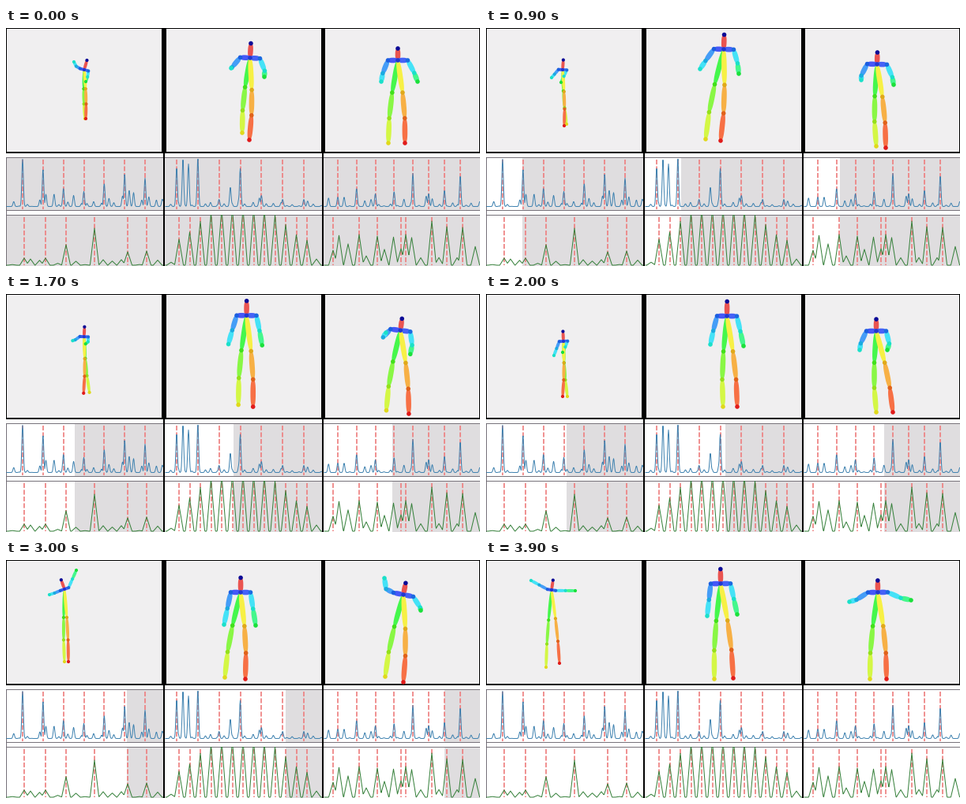
Recreate the animation shown at these times as a matplotlib script. Size 600 by 302 pixels, loop 4 s.

```python
from colorsys import hsv_to_rgb

import numpy as np
import matplotlib.pyplot as plt
from matplotlib.animation import FuncAnimation
from matplotlib.collections import PolyCollection
from matplotlib.patches import Rectangle

W, H, DPI = 600, 302, 100
FRAMES, INTERVAL = 40, 100
PX = 72 / DPI  # one pixel in points
SWEEP = 5.1    # pixels the shade retreats per frame
KEY_TIMES = np.array([0, 9, 13, 20, 25, 30, 39])
rng = np.random.default_rng(4)

fig = plt.figure(figsize=(W / DPI, H / DPI), dpi=DPI, facecolor="white")
ax = fig.add_axes([0, 0, 1, 1])
ax.set_xlim(0, W)
ax.set_ylim(H, 0)
ax.axis("off")

# Joints: 0 neck, 1 head, 2-4 right arm, 5-7 left arm, 8-10 right leg, 11-13 left leg
PARENT = [0, 0, 0, 2, 3, 0, 5, 6, 0, 8, 9, 0, 11, 12]
# Hue runs along each limb from body to tip
LIMB_HUES = [(0.65, 0.52), (0.64, 0.40), (0.34, 0.20), (0.16, 0.04)]
HUES = np.concatenate([np.linspace(a, b, 3) for a, b in LIMB_HUES])
BONE_COLORS = ["#ea5450"] + [hsv_to_rgb(h, 0.72, 0.97) for h in HUES]
JOINT_COLORS = ["#2238d0", "#0c0a96"] + [hsv_to_rgb((h - 0.04) % 1, 0.88, 0.88) for h in HUES]

# Key poses: neck, right wrist, left wrist, right ankle, left ankle
LEFT = [
    [(99, 53), (86, 43), (101, 68), (100, 115), (101, 115)],
    [(97, 53), (83, 63), (95, 69), (102, 122), (99, 124)],
    [(98, 45), (80, 35), (103, 48), (105, 118), (100, 121)],
    [(98, 60), (86, 78), (97, 74), (103, 130), (97, 130)],
    [(89, 48), (73, 65), (89, 54), (84, 129), (98, 133)],
    [(74, 37), (55, 44), (89, 13), (74, 129), (79, 129)],
    [(83, 38), (57, 26), (113, 39), (76, 136), (93, 131)],
]
MIDDLE = [
    [(309, 38), (285, 51), (327, 62), (299, 133), (308, 142)],
    [(301, 27), (271, 52), (320, 58), (278, 141), (297, 143)],
    [(303, 29), (277, 64), (321, 65), (284, 139), (305, 144)],
    [(305, 28), (284, 64), (326, 66), (300, 143), (318, 143)],
    [(303, 44), (285, 81), (324, 80), (298, 151), (326, 148)],
    [(297, 41), (276, 82), (316, 83), (277, 149), (303, 151)],
    [(297, 30), (280, 71), (318, 69), (289, 151), (313, 150)],
]
RIGHT = [
    [(496, 41), (475, 68), (521, 68), (484, 146), (505, 146)],
    [(495, 46), (475, 66), (516, 72), (494, 150), (506, 152)],
    [(504, 45), (490, 28), (519, 74), (469, 146), (508, 152)],
    [(494, 47), (473, 71), (508, 71), (494, 150), (515, 150)],
    [(488, 46), (475, 88), (520, 22), (498, 154), (545, 135)],
    [(503, 44), (479, 23), (525, 64), (480, 148), (503, 155)],
    [(496, 41), (460, 53), (538, 51), (486, 151), (507, 151)],
]


def spline(values):
    """Sample a slightly tight cubic through the key values on every frame."""
    slope = 0.7 * np.gradient(values, KEY_TIMES)
    t = np.arange(FRAMES)
    k = np.clip(np.searchsorted(KEY_TIMES, t, side="right") - 1, 0, len(KEY_TIMES) - 2)
    span = KEY_TIMES[k + 1] - KEY_TIMES[k]
    u = (t - KEY_TIMES[k]) / span
    return ((2 * u**3 - 3 * u**2 + 1) * values[k] + (u**3 - 2 * u**2 + u) * span * slope[k]
            + (3 * u**2 - 2 * u**3) * values[k + 1] + (u**3 - u**2) * span * slope[k + 1])


def build_body(points, size, head):
    """Place all joints from the neck, wrists and ankles."""
    neck, *tips = points
    wrists, ankles = tips[:2], tips[2:]
    # The shoulders lean toward the higher wrist, the head stands square on them
    tilt = 0.06 * (wrists[1][1] - wrists[0][1])
    half = np.array([12.5 * size, tilt])
    up = np.array([half[1], -half[0]]) / np.hypot(*half)
    joints = [neck, neck + head * up]
    for side, wrist in zip((-1, 1), wrists):
        shoulder = neck + side * half
        slack = max(0, 1 - np.hypot(*(wrist - shoulder)) / (40 * size))
        elbow = (shoulder + wrist) / 2 + slack * size * np.array([8 * side, 10])
        joints += [shoulder, elbow, wrist]
    for side, ankle in zip((-1, 1), ankles):
        out = np.array([2.5 * side * size, 0])
        joints += [neck + part * (ankle - neck) + out for part in (0.39, 0.70)] + [ankle]
    return np.array(joints)


ring = np.linspace(0, 2 * np.pi, 32)


def rounded(v):
    return np.sign(v) * np.abs(v) ** 0.75


def bone(a, b, width):
    mid, half = (a + b) / 2, (b - a) / 2
    size = max(np.hypot(*half), 0.1)
    side = np.array([-half[1], half[0]]) / size * width / 2
    return mid + np.outer(rounded(np.cos(ring)), half) + np.outer(rounded(np.sin(ring)), side)


class Dancer:
    def __init__(self, keys, size, head, width, dot):
        keys = np.array(keys, float)
        paths = np.apply_along_axis(spline, 0, keys)
        self.poses = [build_body(p, size, head) for p in paths]
        self.width = width
        self.bones = PolyCollection([], facecolors=BONE_COLORS, edgecolors="none", zorder=5)
        ax.add_collection(self.bones)
        self.joints = ax.scatter(*self.poses[0].T, s=(dot * PX) ** 2, c=JOINT_COLORS,
                                 linewidths=0, zorder=6)

    def draw(self, i):
        p = self.poses[i]
        self.bones.set_verts([bone(p[PARENT[j]], p[j], self.width) for j in range(1, len(p))])
        self.joints.set_offsets(p)


def box(x0, y0, x1, y1, color, z):
    return ax.add_patch(Rectangle((x0, y0), x1 - x0, y1 - y0, fc=color, ec="none", zorder=z))


def chart(span, rows, marks, x, y, color):
    top, bottom = rows
    line, = ax.plot(x, y, color=color, lw=PX, zorder=4)
    line.set_clip_path(Rectangle((span[0], top), span[1] - span[0], bottom - top,
                                 transform=ax.transData))
    ax.vlines(marks, top + 3, bottom - 1, color="#ee8080", lw=1.7 * PX,
              linestyles=[(0, (3.6, 1.4))], zorder=3)
    for edge in rows:
        ax.plot(span, [edge, edge], color="#77727a", lw=PX, zorder=3)


def spikes(span, marks, heights, noise):
    """Narrow bell peaks on the marks with small random bumps between."""
    x = np.arange(span[0] + 1, span[1], 0.5)
    bumps = np.arange(span[0] + 8, span[1], 8.6)
    centers = np.r_[marks, bumps + rng.uniform(-2, 2, len(bumps))]
    sizes = np.r_[heights, rng.gamma(1.5, noise / 1.5, len(bumps))]
    shape = sizes * np.exp(-((x[:, None] - centers) / 1.4) ** 2)
    return x, 226.5 - shape.max(axis=1)


def teeth(span, marks, heights, noise):
    """Triangles on the marks with small random triangles in wide gaps."""
    low = np.arange(span[0] + 8, span[1], 11.5)
    low = low[np.abs(low[:, None] - marks).min(axis=1) > 6.5]
    centers = np.r_[marks, low]
    sizes = np.r_[heights, rng.uniform(0, noise, len(low))]
    x = np.arange(span[0] + 1, span[1], 0.5)
    shape = sizes * np.clip(1 - np.abs(x[:, None] - centers) / 5.6, 0, 1)
    return x, 301 - shape.max(axis=1)


# Light stages in a black frame
box(0, 0, W, 158.5, "black", 1)
for a, b in [(1, 197), (203, 399), (404, 599)]:
    box(a, 1, b, 157, "#f0eff0", 2)

SPANS = [(0, 199), (201, 400), (402, 600)]
ROWS = [(163.5, 230.5), (236.5, 301.5)]

blue_marks = [np.linspace(21, 176, 7), np.linspace(216, 377, 7),
              np.r_[np.linspace(420, 515, 5), 535, 555, 575]]
blue_heights = [(60, 47, 23, 19, 29, 41, 36), (48, 61, 9, 48, 14, 9, 9),
                (12, 23, 16, 19, 42, 16, 20, 38)]
extra_x, extra_h = [(), (224, 231, 284), ()], [(), (59, 54, 24), ()]

green_marks = [np.array([23, 50, 76, 112, 154, 178]), np.linspace(219, 381, 13),
               np.array([414, 447, 470, 500, 506, 539, 558, 578])]
green_heights = [(9, 9, 26, 47, 17, 18),
                 30 + 42 * np.exp(-((green_marks[1] - 298) / 62) ** 4),
                 (19, 39, 37, 21, 39, 56, 49, 48)]

for n, span in enumerate(SPANS):
    peaks = np.r_[blue_marks[n], extra_x[n]]
    tall = np.r_[blue_heights[n], extra_h[n]]
    chart(span, ROWS[0], blue_marks[n], *spikes(span, peaks, tall, (9, 4, 5)[n]), "#3f82b0")
    chart(span, ROWS[1], green_marks[n],
          *teeth(span, green_marks[n], green_heights[n], (10, 10, 38)[n]), "#35803a")
for x in (199, 400):
    box(x, 158, x + 2, H, "black", 7)
box(0, ROWS[0][0], 1, H, "#77727a", 3)

shades = [(box(a, top, b, bottom, "#dfdddf", 2), a, b)
          for a, b in SPANS for top, bottom in ROWS]
dancers = [Dancer(LEFT, 0.42, 12.5, 4, 4.2),
           Dancer(MIDDLE, 1, 18.5, 6.6, 5.6),
           Dancer(RIGHT, 1, 15, 6.6, 5.6)]


def draw(i):
    for patch, a, b in shades:
        edge = min(a + SWEEP * i, b)
        patch.set_x(edge)
        patch.set_width(b - edge)
    for d in dancers:
        d.draw(i)
    return []


anim = FuncAnimation(fig, draw, frames=FRAMES, interval=INTERVAL, repeat=True, repeat_delay=0)
plt.show()
```
